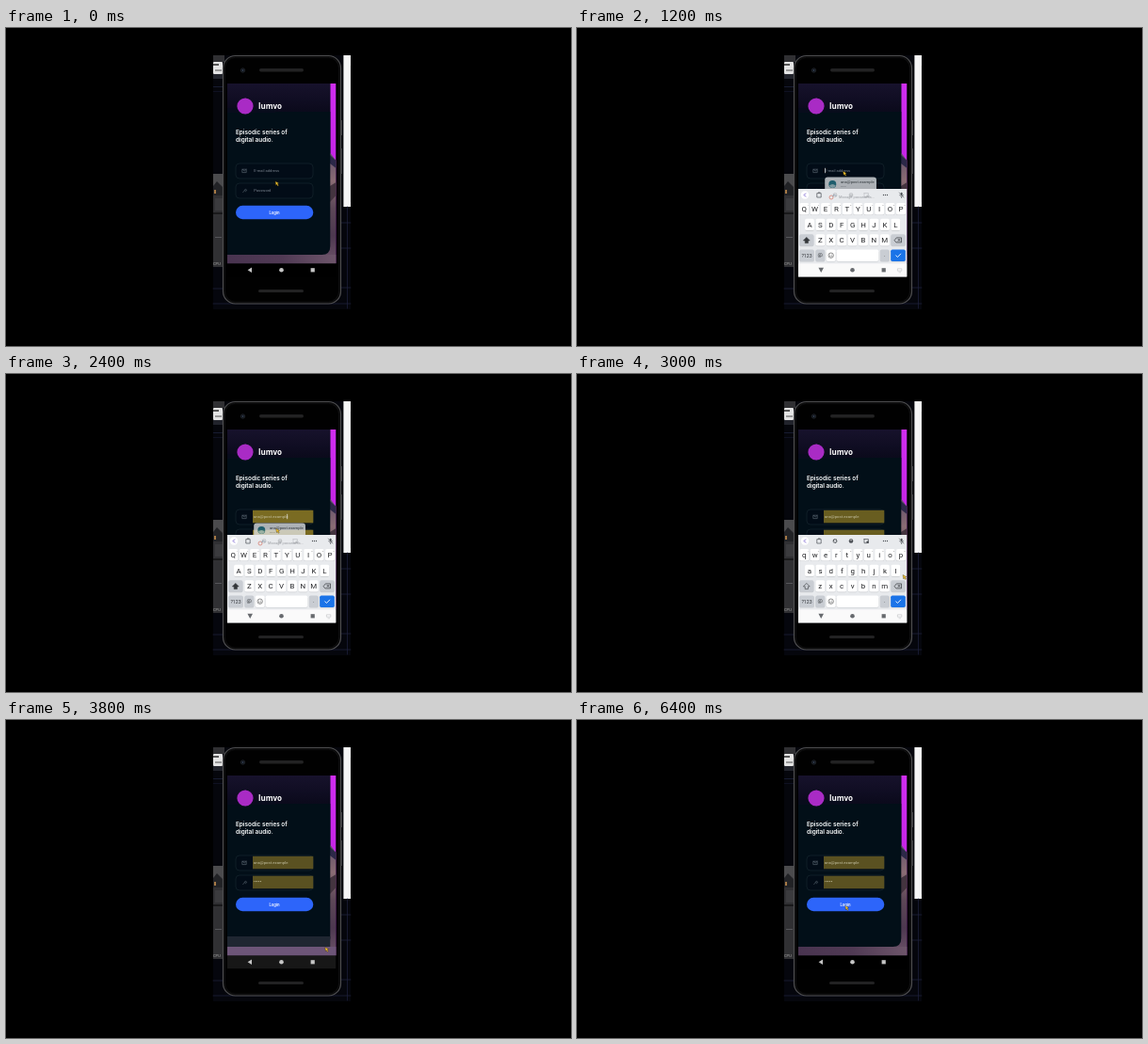
Write an HTML page that moves like this. It is 600 by 338 pixels and loops after 8000 ms.

```html
<!DOCTYPE html>
<html lang="en">
<head>
<meta charset="utf-8">
<title>Login screen demo</title>
<style>
  html, body { margin: 0; width: 100%; height: 100%; overflow: hidden; background: #000; }
  svg { display: block; width: 100vw; height: 100vh; }
  text { font-family: Roboto, "Noto Sans", sans-serif; }
  .strong { font-family: Inter, Roboto, sans-serif; font-weight: 600; }
  .brand { font-family: "Noto Sans", sans-serif; font-weight: 700; }
</style>
</head>
<body>
<svg id="stage" viewBox="0 0 600 338" xmlns="http://www.w3.org/2000/svg"></svg>
<script>
const LOOP = 8000, STEP = 200;
const EMAIL = "ana@post.example";
const stage = document.getElementById("stage");

const rect = (x, y, w, h, fill, r = 0, extra = "") =>
  `<rect x="${x}" y="${y}" width="${w}" height="${h}" rx="${r}" fill="${fill}" ${extra}/>`;
const circle = (x, y, r, fill, extra = "") =>
  `<circle cx="${x}" cy="${y}" r="${r}" fill="${fill}" ${extra}/>`;
const path = (d, fill, extra = "") => `<path d="${d}" fill="${fill}" ${extra}/>`;
const line = (d, color, w = .7) =>
  path(d, "none", `stroke="${color}" stroke-width="${w}" stroke-linecap="round" stroke-linejoin="round"`);
const label = (x, y, size, fill, str, extra = "") =>
  `<text x="${x}" y="${y}" font-size="${size}" fill="${fill}" ${extra}>${str}</text>`;
const centred = 'text-anchor="middle"';
const group = (id, body) => `<g id="${id}">${body}</g>`;

function desktop() {
  let s = rect(220, 29, 146, 270, "#05060c");
  // editor window showing on the left
  s += rect(220, 29, 12, 7, "#303033");
  s += rect(220, 36, 10, 13, "#e4e4e4", 1) + rect(220, 38, 6, 2, "#555") + rect(222, 44, 7, 2, "#999");
  s += rect(220, 49, 10, 5, "#22242c") + rect(220, 62, 10, .6, "#242a48") + rect(220, 67, 10, .6, "#161a30");
  s += rect(220, 155, 10, 23, "#4b4b4d") + path("M220 178V168l4-5 6 6v9z", "#222326");
  s += rect(221, 172, 2, 4, "#a67945");
  s += rect(220, 178, 10, 76, "#303033") + rect(222, 181, 8, 13, "#3b3b3e") + rect(220, 196, 10, 2, "#19191b");
  s += rect(222, 222, 7, .8, "#606064") + label(220, 252, 4, "#aaa", "CPU");
  s += rect(220, 254, 10, 45, "#05060d");
  // white page and dark grid on the right
  s += rect(358.4, 29, 7.6, 161, "#f6f6f6") + rect(364.8, 40, .6, 145, "#ddd");
  s += line("M220 277H230M220 293H366M362.5 190V298M355 207H366M355 234H366M355 276H366", "#20233f", .7);
  return s;
}

function phone() {
  return rect(230.5, 29.5, 125, 263.5, "#070707", 13, 'stroke="#4e4e50" stroke-width="1.2"') +
    rect(232.3, 31.3, 121.4, 259.9, "#010101", 11.5, 'stroke="#19191a" stroke-width=".7"') +
    rect(355.5, 98, 1.3, 16, "#4b4b4d") + rect(355.5, 128, 1.3, 27, "#454547") +
    circle(251.5, 45, 2.2, "#0c0f15", 'stroke="#262a32" stroke-width=".8"') + circle(251.5, 45, .8, "#4b5b76") +
    rect(269, 43, 47, 3.4, "#222223", 1.7) + rect(268, 278, 48, 3, "#222223", 1.5);
}

function field(y, hint, icon) {
  return rect(244, y, 82, 16, "#020c17", 4, 'stroke="#14222b" stroke-width=".8"') +
    line(icon, "#53606c", .7) + `<g class="hint">${label(263.3, y + 9.4, 4.1, "#7c8590", hint)}</g>`;
}

function app() {
  let s = rect(235, 59, 115.5, 191.5, "url(#sky)");
  s += rect(344.5, 59, 6, 191, "url(#wall)");
  // blurred photo behind the card's lower right edge
  s += path("M335 133H344.5L350.5 141V250H335z", "url(#photo)");
  s += path("M344 135l6.5 6v8l-6.5-5z", "#2c2848") + path("M344 168l6.5-4v14l-6.5 7z", "#44343f");
  s += rect(235, 241, 115.5, 9.5, "url(#floor)");
  s += path("M235 89H344.3V232q0 9-9 9H235z", "#020f18");
  s += path("M235 85H286V90H235z", "#080c1c");
  s += circle(254, 83, 8.6, "#a92bc5");
  s += label(268, 86.2, 8, "#fff", "lumvo", 'class="brand"');
  s += label(244, 113.2, 6.4, "#fff", "Episodic series of", 'class="strong"');
  s += label(244, 121.2, 6.4, "#fff", "digital audio.", 'class="strong"');
  s += field(144, "E-mail address", "M251.2 150.2h4v3.4h-4zl2 1.8 2-1.8");
  s += field(165, "Password", "M251.7 174.6l2.4-2.4M253.2 172.2a1.2 1.2 0 1 1 1.5 1.5");
  s += group("filled",
    rect(262, 144.8, 64.3, 13.5, "#655a20", 0, 'class="fill"') +
    rect(262, 165.7, 64.3, 13.5, "#655a20", 0, 'class="fill"') +
    label(262.8, 153.2, 4.3, "#c6c3a5", EMAIL) + label(263, 174.3, 5, "#c6c3a5", "•••••"));
  s += rect(0, 148.8, .7, 5.4, "#eee", 0, 'id="caret"');
  s += rect(244, 188.8, 82.3, 14.4, "#2d65fa", 7.2);
  s += label(285, 197.8, 4.2, "#fff", "Login", `class="strong" ${centred}`);
  s += rect(235, 250.5, 115.5, 14, "#000");
  s += group("band", rect(235, 230, 109.3, 11, "#1f2631") + rect(235, 241, 115.5, 9.5, "#6d5578") +
    rect(235, 250.5, 115.5, 14, "#171717"));
  return s + navIcons("#c5c5c5", "M261 254.6V260L256.6 257.3z");
}

const navIcons = (color, back) => path(back, color) + circle(292.5, 257.3, 2.3, color) + rect(323.6, 255.2, 4.2, 4.2, color);

function key(x, y, w, fill = "#fff") {
  return rect(x - w / 2, y + .7, w, 12.4, "#c9ccd0", 1.7) + rect(x - w / 2, y, w, 12.4, fill, 1.7);
}

function letterRow(chars, x0, y) {
  return [...chars].map((c, i) => {
    const x = x0 + i * 11.42;
    const digit = y < 190 ? label(x + 3.2, y + 3.2, 2.4, "#777", (i + 1) % 10) : "";
    return key(x, y, 9.9) + digit +
      label(x, y + 9, 7.9, "#202124", c, `class="letter" ${centred}`);
  }).join("");
}

function keyboard() {
  const ink = "#4a4e54", gray = "#c9cdd3";
  let s = rect(235, 171, 115.5, 94, "#e8eaed");
  s += circle(242, 177.5, 4.2, "#fff") + line("M242.7 175.9l-1.6 1.6 1.6 1.6", "#6045c8", .8);
  s += line("M255.2 175.6h4v4.4h-4zM256.4 174.9h1.6", ink);
  s += circle(274, 177.5, 1.8, "none", `stroke="${ink}" stroke-width="1.2" stroke-dasharray="1.1 .3"`);
  s += circle(291, 177.5, 2.3, ink) + circle(290.2, 176.8, .5, "#fff") + circle(291.7, 176.7, .5, "#fff");
  s += line("M305 175.5h4.4v2.5M305 175.5v4.2h2.4", ink) + rect(307.4, 177.6, 2.4, 2.4, ink, .5);
  for (const x of [325.5, 327.5, 329.5]) s += circle(x, 177.5, .65, ink);
  s += rect(343.7, 174.8, 1.9, 3.5, ink, 1) + line("M342.6 177.5q2 3.8 4 0M344.6 179.4v1.2M342.3 175l4.6 5", ink, .6);

  s += letterRow("QWERTYUIOP", 241.2, 186);
  s += letterRow("ASDFGHJKL", 247, 202.7);
  s += letterRow("ZXCVBNM", 258.3, 219.2);
  s += key(243.8, 219.2, 15.2, gray) + key(341, 219.2, 15.2, gray);
  s += path("M243.8 222.4l3.4 3.5h-1.8v2.7h-3.2v-2.7h-1.8z", "#33363a", 'id="shift" stroke="#33363a" stroke-width=".6"');
  s += line("M337.3 225.4l2-2.5h5.2v5h-5.2zM341 224.3l2 2.2M343 224.3l-2 2.2", "#33363a");

  s += key(244, 235.5, 15.6, gray) + label(244, 243.6, 5.2, "#33363a", "?123", centred);
  s += key(258.3, 235.5, 9.8, gray) + label(258.3, 243.4, 6, "#33363a", "@", centred);
  s += key(269.7, 235.5, 9.9) + circle(269.7, 241.7, 2.7, "none", 'stroke="#444" stroke-width=".6"');
  s += circle(268.8, 241, .4, "#444") + circle(270.6, 241, .4, "#444") + line("M268.3 242.5q1.4 1.5 2.8 0", "#444", .5);
  s += key(298, 235.5, 44.5) + key(326.8, 235.5, 9.8, gray) + label(326.8, 243, 6, "#33363a", ".", centred);
  s += key(341, 235.5, 15.6, "#1a73e8") + line("M338.7 241.8l1.7 1.7 3.3-3.4", "#fff", .9);
  s += rect(235, 250.4, 115.5, 14.1, "#fafafa");
  s += navIcons("#676a6e", "M256.4 254.8h5.6L259.2 260z");
  return s + line("M340.8 255.8h4v2.4h-4zM342 259.8h1.6", "#c0c2c5", .6);
}

function popup() {
  return rect(263.2, 158.4, 54.8, 27, "#e8eaed", 3) +
    circle(271.3, 166, 4, "#28788a") + path("M267.8 167.6a3.8 3.8 0 0 0 7 0q-3.5-3-7 0z", "#a9cad0") +
    label(280, 165, 4.2, "#3c4043", EMAIL) + label(280, 169.5, 3.4, "#85898e", "•••••") +
    circle(270, 180, 2, "none", 'stroke="#d56e5c" stroke-width=".9"') + line("M271.5 178.7l2.4-1.6 1 1.4", "#7b8fa4", .9) +
    label(278, 181.4, 4, "#85898e", "Manage passwords…");
}

const gradient = (id, stops, slope = 'x2="0" y2="1"') =>
  `<linearGradient id="${id}" ${slope}>${stops.map((c, i) =>
    `<stop offset="${i / (stops.length - 1)}" stop-color="${c}"/>`).join("")}</linearGradient>`;

stage.innerHTML = `<defs>
  ${gradient("sky", ["#17122c", "#0b0a1c", "#0b0d20"], 'x2="0" y2=".3"')}
  ${gradient("wall", ["#d02df0", "#b719d8"])}
  ${gradient("photo", ["#62506a", "#8a6c74", "#5d4757", "#4d3850", "#6d5369"])}
  ${gradient("floor", ["#493450", "#503a54", "#6e566b"], 'x2="1" y2="0"')}
  <clipPath id="screen"><rect x="235" y="59" width="115.5" height="205.5"/></clipPath></defs>` +
  rect(0, 0, 600, 338, "#000") + desktop() + phone() +
  `<g clip-path="url(#screen)">${app()}${group("keys", keyboard())}${group("popup", popup())}</g>` +
  group("cursor", path("M0 0l3.8 2.1-1.5.5 1.2 1.7-.9.6-1.2-1.7-.7 1.1z", "#f5c52f", 'stroke="#2b2108" stroke-width=".35"'));

const $ = id => document.getElementById(id);
const letters = [...document.querySelectorAll(".letter")].map(el => ({ el, upper: el.textContent }));
const hints = document.querySelectorAll(".hint");
const fills = document.querySelectorAll(".fill");

// [time, x, y] of the pointer tip
const track = [
  [0, 286, 163], [200, 284, 155], [400, 282.5, 152.3], [1400, 284, 155.5], [1600, 296, 161],
  [1800, 296, 164], [2000, 286.7, 164.3], [3000, 346, 213.5], [3200, 340, 236.5],
  [3400, 338.6, 240], [3800, 338.8, 241.5], [4200, 296.5, 218.5], [4400, 285.5, 197.5], [4800, 284.8, 197.5]
];
const within = (t, a, b) => t >= a && t < b;
const show = (el, on) => el.setAttribute("visibility", on ? "visible" : "hidden");

function popupOpacity(t) {
  if (!within(t, 1000, 2600)) return 0;
  if (t < 1200) return .25;
  return t < 1400 || t >= 2400 ? .74 : 1;
}

function draw(ms) {
  const t = Math.floor(ms % LOOP / STEP) * STEP;
  const [, x, y] = track.filter(p => p[0] <= t).pop();
  $("cursor").setAttribute("transform", `translate(${x} ${y})`);

  show($("keys"), within(t, 1000, 3800));
  $("keys").setAttribute("transform", `translate(0 ${t < 1200 ? 7 : 0})`);
  $("popup").setAttribute("opacity", popupOpacity(t));

  const filled = t >= 2400, lower = t >= 2600;
  show($("filled"), filled);
  hints.forEach(h => show(h, !filled));
  fills.forEach(f => f.setAttribute("fill", t < 2600 ? "#7a6b22" : t < 3800 ? "#685d20" : "#5a5121"));
  letters.forEach(l => { l.el.textContent = lower ? l.upper.toLowerCase() : l.upper; });
  $("shift").setAttribute("fill", lower ? "none" : "#33363a");

  show($("caret"), within(t, 800, 3000) || within(t, 3600, 3800));
  $("caret").setAttribute("x", filled ? 298.4 : 263.2);
  show($("band"), within(t, 3800, 4000));
}

function tick() {
  draw(performance.now());
  requestAnimationFrame(tick);
}
tick();
</script>
</body>
</html>
```
